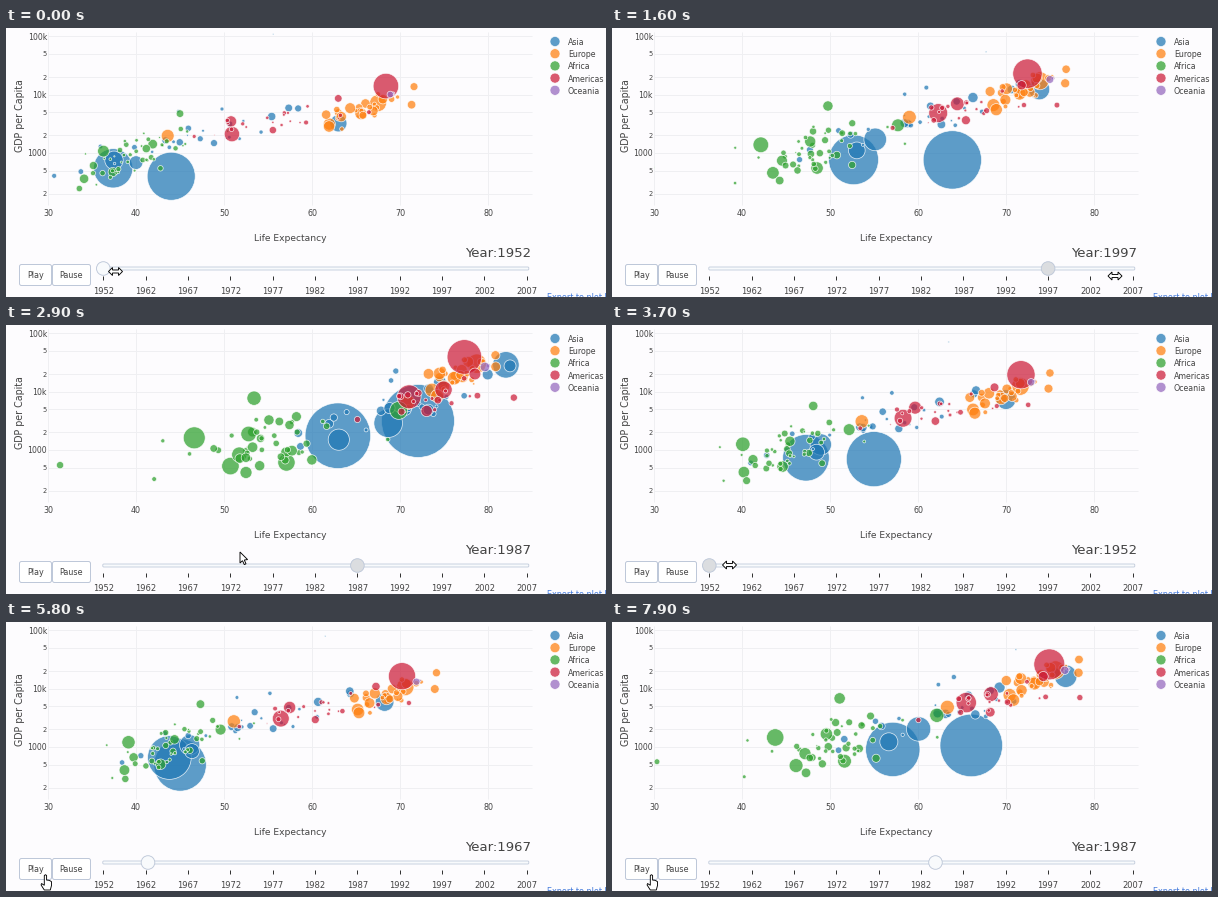
A matplotlib script that plays this animation: 600x269 px, repeating every 8 s.

```python
import numpy as np
import matplotlib.pyplot as plt
from matplotlib.animation import FuncAnimation
from matplotlib.colors import to_rgba
from matplotlib.patches import Circle, FancyBboxPatch, Polygon, Rectangle

W, H, DPI = 600, 269, 64
PT = 72 / DPI  # points per pixel
STEP_MS, FRAMES = 100, 80
INK, RIM, GRID, PAPER = "#444444", "#bec8d9", "#efeff2", "#fdfcfe"
ALPHA = 0.72
YEARS = [1952] + list(range(1962, 2008, 5))

NAMES = ["Asia", "Europe", "Africa", "Americas", "Oceania"]
COLORS = ["#1f77b4", "#ff7f0e", "#2ca02c", "#cb1b38", "#9467bd"]
GROWTH = [2.4, 1.3, 3.5, 2.4, 2.1]  # of the population, 1952 to 2002

# Typical development of a country: share of the total gain reached by KNOTS.
KNOTS = [1952, 1962, 1972, 1982, 2002]
LIFE_CURVE = np.array([0, 0.27, 0.5, 0.7, 1])
GDP_CURVE = np.array([0, 0.27, 0.56, 0.72, 1])

# The three largest: continent, population 1952 and 2002, life and GDP at KNOTS.
GIANTS = [
    (0, 556, 1280, [44, 44.5, 63.1, 65.5, 72], [400, 488, 677, 962, 3119]),
    (0, 372, 1034, [37.4, 43.6, 50.7, 56.6, 62.9], [547, 658, 724, 856, 1747]),
    (3, 157, 288, [68.4, 70.2, 71.3, 74.7, 77.3], [13990, 16173, 21806, 25010, 39097]),
]
# Other large or outlying: continent, population, life and GDP at both ends.
LEADERS = [
    (0, 82, 37.5, 68.6, 750, 2874),
    (0, 70, 63, 82, 3217, 28605),
    (0, 45, 40, 63, 684, 1500),
    (0, 0.4, 55.6, 77, 108000, 35000),
    (1, 40, 43.6, 70.8, 1969, 6508),
    (1, 69, 67.5, 78.7, 7144, 30036),
    (2, 33, 36.3, 46.6, 1077, 1615),
    (2, 22, 41.9, 69.8, 1419, 4755),
    (2, 21, 34.1, 50.7, 362, 530),
    (2, 14, 45, 53.4, 4725, 7711),
    (3, 57, 50.9, 71, 2109, 8131),
    (3, 30, 50.8, 74.9, 3478, 10742),
]
# Everyone else: continent, count, population, life and GDP at both ends,
# then the spread of life, its drift over time and the spread of log GDP.
CLOUDS = [
    (0, 26, 5, 46, 70, 1600, 5500, 7, 2, 0.3),
    (1, 28, 8, 66.3, 77, 5800, 20000, 2.6, 0.6, 0.15),
    (2, 46, 3, 39.5, 53, 1000, 1400, 4, 5, 0.24),
    (3, 22, 3.3, 54, 72, 3000, 6500, 6, 1.5, 0.15),
    (4, 2, 4.5, 69.2, 79.8, 10300, 27000, 0.2, 0.1, 0.02),
]

rng = np.random.default_rng(12)


def country(group, pop, life, gdp):
    return group, np.log10(np.vstack([pop, gdp])), np.array(life, float)


def grow(group, pop, life0, life1, gdp0, gdp1):
    """A country that follows the typical curves from start to end."""
    years = (np.array(KNOTS) - 1952) / 50
    return country(group, pop * GROWTH[group]**years,
                   life0 + (life1 - life0) * LIFE_CURVE,
                   gdp0 * (gdp1 / gdp0)**GDP_CURVE)


def cloud(group, n, pop, life0, life1, gdp0, gdp1, spread, drift, gdp_spread):
    """Random countries around a typical one; longer lives go with more GDP."""
    for _ in range(n):
        q, wealth, size = rng.normal(size=3)
        shift = spread * q
        rich = 10**(gdp_spread * (0.7 * q + 0.7 * wealth))
        turn = 10**(0.4 * gdp_spread * rng.normal())
        yield grow(group, pop * np.exp(0.9 * size), life0 + shift,
                   life1 + 0.7 * shift + drift * rng.normal(),
                   gdp0 * rich, gdp1 * rich * turn)


def build_states():
    """Life, log GDP and log population of all countries for each of YEARS."""
    world = [country(g, np.geomspace(a, b, 51)[[0, 10, 20, 30, 50]], life, gdp)
             for g, a, b, life, gdp in GIANTS]
    world += [grow(*row) for row in LEADERS]
    for row in CLOUDS:
        world += cloud(*row)
    world.sort(key=lambda c: c[0])
    tracks = np.array([[life, logs[1], logs[0]] for _, logs, life in world])
    # carry the last slope on to 2007
    last = tracks[..., -1:]
    tracks = np.concatenate([tracks, last + (last - tracks[..., -2:-1]) / 4], axis=-1)
    knots = KNOTS + [2007]
    states = [np.apply_along_axis(lambda v: np.interp(y, knots, v), -1, tracks).T
              for y in YEARS]
    return [c[0] for c in world], states


GROUP, STATES = build_states()

# While dragging, the chart redraws at intervals and trails the slider.
REDRAW, LAG = 297, 400
PLAY_START, PLAY_STEP = 5180, 500


def ease(u):
    u = min(max(u, 0), 1)
    return 4 * u**3 if u < 0.5 else 1 - 4 * (1 - u)**3


def drag(t):
    """Slider step under the hand."""
    return round(np.interp(t, [200, 1600, 1900, 2100, 2900, 3150],
                           [0, 8, 10, 10, 6, 0]))


REDRAWS = [282 + REDRAW * k for k in range(13)]
MOVES = [(t, drag(t - LAG), REDRAW) for t in REDRAWS]
MOVES += [(PLAY_START + PLAY_STEP * k, k + 1, PLAY_STEP) for k in range(6)]


def chart(t):
    """Eased moves between states, each from wherever the last one got to."""
    now = STATES[0]
    ends = [m[0] for m in MOVES[1:]] + [np.inf]
    for (start, k, length), end in zip(MOVES, ends):
        if t < start:
            break
        now = now + (STATES[k] - now) * ease((min(t, end) - start) / length)
    return now


def slider(t):
    """Handle position in steps, and the step named by the label."""
    if t < PLAY_START:
        return drag(t), drag(t)
    k, rest = divmod(t - PLAY_START, PLAY_STEP)
    return k + ease(rest / PLAY_STEP), k + 1


def pointer(t):
    times = [0, 100, 1600, 1900, 2300, 2900, 3400, 3700, 4000, 4500]
    x = np.interp(t, times, [109.5, 112, 503, 527, 520, 234, 150, 117.5, 112, 39.5])
    y = np.interp(t, times, [243.5, 244, 248, 245, 240, 227, 236, 240, 243, 253.5])
    if t > 4300:
        return "hand", x, y
    return ("arrow" if 2500 < t < 3400 or t > 4050 else "resize"), x, y


def px(life):
    return 42 + 8.8 * (life - 30)


def py(log_gdp):
    return 125 - 58.4 * (log_gdp - 3)


fig = plt.figure(figsize=(W / DPI, H / DPI), dpi=DPI, facecolor=PAPER)
ax = fig.add_axes([0, 0, 1, 1])
ax.set_xlim(0, W)
ax.set_ylim(H, 0)
ax.axis("off")


def text(x, y, s, size, ha="center", color=INK, **kw):
    return ax.text(x, y, s, fontsize=size * PT, ha=ha, color=color, family="DejaVu Sans",
                   va=kw.pop("va", "center_baseline"), **kw)


def line(xs, ys, color, **kw):
    ax.plot(xs, ys, color=color, lw=PT, solid_capstyle="butt", **kw)


# grid and axis labels
LEFT, RIGHT, TOP, BOTTOM = 42, 526, 4, 177
for life in range(30, 90, 10):
    line([px(life)] * 2, [TOP, BOTTOM], GRID, zorder=1)
    text(px(life), 184.5, str(life), 8)
for power, name in [(2, None), (3, "1000"), (4, "10k"), (5, "100k")]:
    for digit in (1, 2, 5):
        y = py(power + np.log10(digit))
        if TOP < y < BOTTOM:
            line([LEFT, RIGHT], [y, y], GRID, zorder=1)
            text(41, y, name if digit == 1 else str(digit),
                 7.7 if digit == 1 else 6.6, "right")
text(284.5, 209.5, "Life Expectancy", 9.1)
text(14.5, 88, "GDP per Capita", 9.5, rotation=90, va="center")

# legend
for k, (name, color) in enumerate(zip(NAMES, COLORS)):
    y = 13.5 + 12.2 * k
    ax.add_patch(Circle((549, y), 5, fc=to_rgba(color, ALPHA), ec="white", lw=0.6 * PT))
    text(562, y, name, 7.9, "left")

# bubbles
blank = np.zeros(len(GROUP))
dots = ax.scatter(blank, blank, s=1, zorder=3,
                  c=[to_rgba(COLORS[g], ALPHA) for g in GROUP],
                  edgecolors=[(1, 1, 1, 0.85)], linewidths=0.7 * PT)
dots.set_clip_path(Rectangle((LEFT, TOP), RIGHT - LEFT, BOTTOM - TOP,
                             transform=ax.transData))

# buttons
for x, width, name in [(13.5, 32, "Play"), (46.5, 38, "Pause")]:
    ax.add_patch(FancyBboxPatch((x + 2, 238.5), width - 4, 17, fc="white", ec=RIM,
                                boxstyle="round,pad=2,rounding_size=2", lw=PT))
    text(x + width / 2, 247, name, 8)

# slider
RAIL, GAP = 97.3, 42.35
ax.add_patch(FancyBboxPatch((RAIL, 239.5), 10 * GAP + 1.5, 2, fc="#f8fafc", ec=RIM,
                            boxstyle="round,pad=0.5,rounding_size=1", lw=0.8 * PT, zorder=4))
for k, year in enumerate(YEARS):
    line([RAIL + GAP * k] * 2, [247.5, 251.5], "#333333")
    text(RAIL + GAP * k, 262.5, str(year), 8.4)
handle = Circle((RAIL, 240.5), 6.8, ec=RIM, lw=0.9 * PT, zorder=5)
ax.add_patch(handle)
label = text(525.5, 224, "", 13.3, "right")
text(541, 269, "Export to plot.ly »", 8, "left", "#447bdc")

# mouse pointers, with the hot spot at the origin
SHAPES = {
    "resize": [(-7, 0), (-3, -4), (-3, -1.5), (3, -1.5), (3, -4), (7, 0),
               (3, 4), (3, 1.5), (-3, 1.5), (-3, 4)],
    "arrow": [(0, 0), (0, 11), (2.5, 8.7), (4.3, 12.6), (6, 11.8), (4.3, 8), (7.6, 7.6)],
    "hand": [(-1.2, 0), (0, -0.8), (1.1, 0), (1.1, 4.6), (3, 4.7), (4.6, 5.3), (6, 6.2),
             (6, 10), (4.8, 14.5), (-1.2, 14.5), (-4.4, 9.5), (-4, 8), (-1.2, 9.8)],
}
mice = {kind: Polygon(shape, fc="white", ec="black", lw=0.9 * PT, zorder=9)
        for kind, shape in SHAPES.items()}
for mouse in mice.values():
    ax.add_patch(mouse)


def update(i):
    t = i * STEP_MS
    life, gdp, pop = chart(t)
    dots.set_offsets(np.column_stack([px(life), py(gdp)]))
    radius = 1.018 * np.sqrt(10**pop)
    dots.set_sizes((2 * radius * PT)**2)

    pos, step = slider(t)
    handle.center = (RAIL + GAP * pos, 240.5)
    handle.set_facecolor("#dbdde0" if 100 < t < 3900 else "#f8fafc")
    label.set_text(f"Year:{YEARS[step]}")

    shown, x, y = pointer(t)
    for kind, mouse in mice.items():
        mouse.set_visible(kind == shown)
    mice[shown].set_xy(np.array(SHAPES[shown]) + (x, y))
    return []


anim = FuncAnimation(fig, update, frames=FRAMES, interval=STEP_MS,
                     init_func=lambda: update(0), repeat=True, repeat_delay=0)
plt.show()
```
